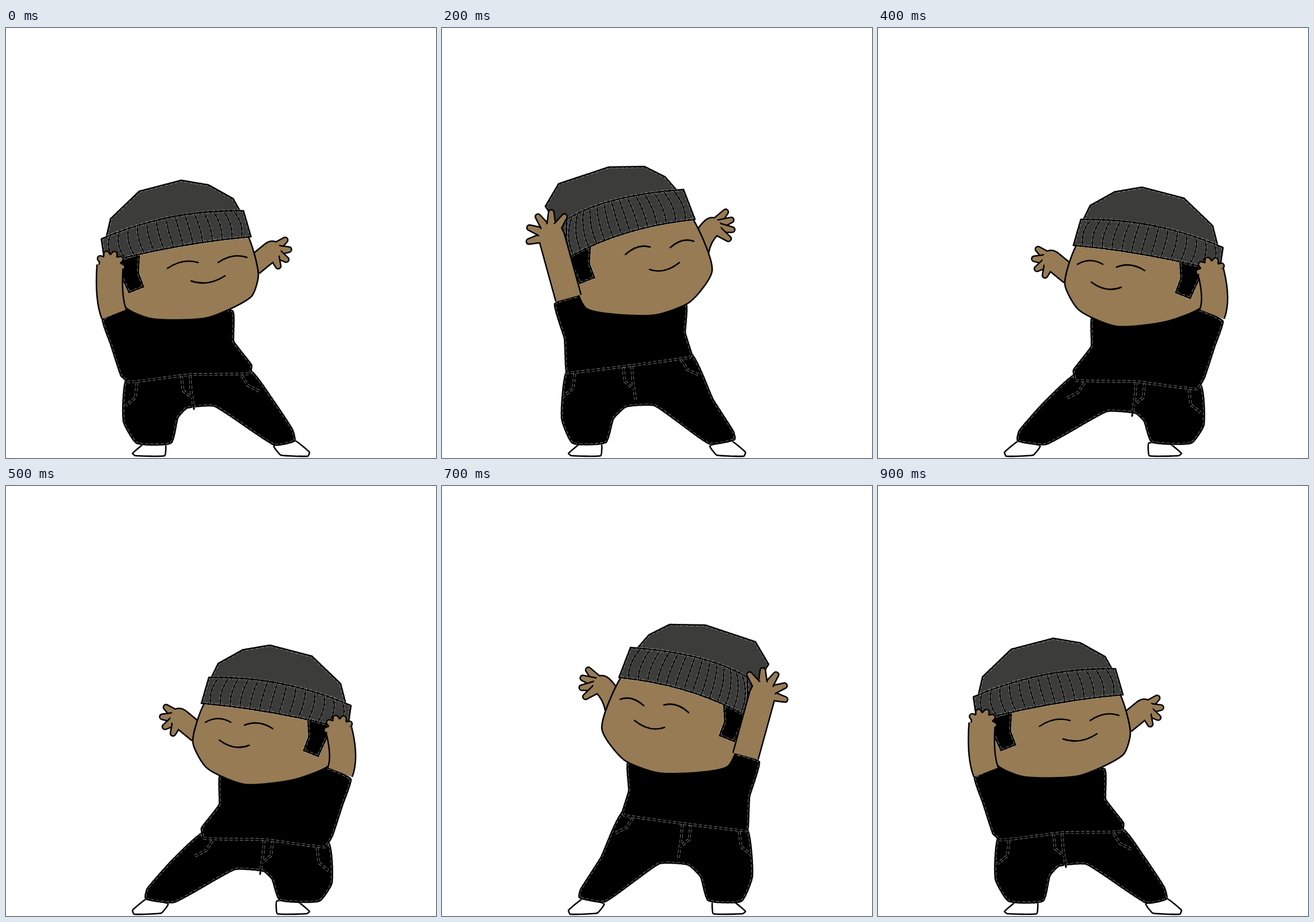
These frames come from a looping animation (748x748 px, 1000 ms). An HTML page:

```html
<!DOCTYPE html>
<html lang="en">
<head>
<meta charset="utf-8">
<title>Dancing in a beanie</title>
<style>
html, body { margin: 0; width: 100%; height: 100%; overflow: hidden; background: #fff; }
svg { display: block; width: 100vw; height: 100vh; }
path { stroke-linejoin: round; }
</style>
</head>
<body>
<svg id="stage" viewBox="0 0 748 748"></svg>
<script>
const SKIN = '#967b55', HAT = '#3c3c3b', LIGHT = '#c4c4c4', INK = '#000';
const STEP = 100, RIBS = 15;

// Key points are flat lists: x, y, x, y ...
const pairs = a => a.flatMap((v, i) => i % 2 ? [] : [[v, a[i + 1]]]);
const move = (a, dx, dy) => a.map((v, i) => v + (i % 2 ? dy : dx));
const flip = (a, axis) => pairs(a).reverse().flatMap(([x, y]) => [2 * axis - x, y]);
const both = (half, axis) => [...half, ...flip(half, axis)];

function mix(a, b, k) {
  if (typeof a === 'number') return a + (b - a) * k;
  if (Array.isArray(a)) return a.map((v, i) => mix(v, b[i], k));
  return Object.fromEntries(Object.keys(a).map(key => [key, mix(a[key], b[key], k)]));
}

// The sideburn has one form and hangs from the hat.
const sideburn = (x, y) =>
  move([-35, 8, 0, -4, -2, 30, 7, 54, -18, 64, -28, 42, -34, 29], x, y);

// Limbs: hand x, y, bend x, y, shoulder x, y, fan angle, finger gap, finger length, palm radius.
// Side poses face right; the other side is drawn mirrored.
const low = {
  crown: [182, 332, 232, 284, 305, 265, 352, 273, 395, 297],
  cuff: [166, 367, 282, 316, 413, 318, 426, 363, 301, 374, 172, 408],
  face: [194, 437, 207, 485, 255, 506, 350, 504, 426, 468, 439, 428, 421, 362],
  eyes: [281, 418, 334, 408, 369, 408, 419, 399],
  mouth: [322, 440, 381, 431],
  hair: [sideburn(232, 396)],
  left: [208, 488, 168, 507, 182, 550, 200, 605],
  waist: [214, 616, 320, 603, 425, 601],
  right: [427, 586, 396, 545, 394, 492],
  legs: [214, 602, 204, 683, 227, 722, 287, 722, 299, 678, 315, 661, 363, 658,
    466, 725, 502, 718, 498, 698, 463, 645, 422, 594],
  near: [181, 413, 177, 470, 188, 498, 291, 38, 25, 18],
  far: [463, 387, 447, 400, 430, 414, 15, 36, 33, 15]
};

const high = {
  crown: [180, 310, 203, 271, 290, 242, 352, 241, 388, 259],
  cuff: [217, 333, 284, 291, 420, 281, 440, 333, 312, 346, 215, 402],
  face: [224, 413, 249, 486, 300, 498, 372, 499, 432, 476, 470, 421, 437, 333],
  eyes: [319, 394, 362, 381, 397, 382, 438, 371],
  mouth: [361, 420, 413, 408],
  hair: [sideburn(258, 380)],
  left: [243, 465, 196, 480, 213, 540, 215, 585],
  waist: [217, 600, 330, 587, 431, 573],
  right: [434, 566, 423, 530, 424, 479],
  legs: [222, 588, 208, 678, 227, 722, 285, 721, 298, 680, 320, 659, 370, 657,
    464, 723, 509, 716, 507, 702, 472, 647, 428, 562],
  near: [190, 361, 205, 415, 220, 470, 235, 35, 44, 21],
  far: [470, 346, 452, 362, 447, 390, -6, 28, 39, 15]
};

const lowFar = {
  ...low,
  crown: move(low.crown, -16, 12),
  cuff: move(low.cuff, -18, 15),
  face: [173, 455, 187, 487, 248, 511, 333, 519, 398, 491, 423, 445, 404, 380],
  eyes: [284, 422, 333, 416, 357, 411, 401, 411],
  mouth: [325, 451, 377, 442],
  hair: [sideburn(223, 406)],
  left: move(low.left, -20, 3),
  waist: move(low.waist, -21, 12),
  right: move(low.right, -19, 9),
  legs: [190, 616, 181, 690, 203, 722, 272, 720, 285, 684, 300, 670, 350, 667,
    455, 724, 505, 718, 502, 700, 458, 650, 400, 600],
  near: [169, 424, 157, 472, 167, 498, 285, 38, 25, 18],
  far: [...move(low.far.slice(0, 6), -16, 16), ...low.far.slice(6)]
};

const MID = 368;
const side = [291, 432, 246, 449, 264, 492, 270, 525, 269, 555];
const lock = [241, 326, 262, 317, 248, 335, 246, 360];
const front = {
  crown: [285, 232, 301, 216, 373, 204, 440, 227, 463, 259],
  cuff: [247, 282, 372, 236, 480, 279, 497, 329, 372, 295, 239, 325],
  face: both([247, 335, 251, 367, 272, 400, 298, 437, 345, 453], MID),
  eyes: [296, 344, 345, 343, 393, 346, 440, 349],
  mouth: [342, 371, 397, 374],
  hair: [lock, flip(lock, MID)],
  left: side,
  waist: [267, 565, 368, 577, 469, 565],
  right: flip(side, MID),
  legs: both([270, 555, 240, 660, 236, 710, 262, 726, 299, 721, 308, 693, 340, 664], 373.5),
  near: [215, 356, 242, 395, 267, 440, 206, 40, 40, 20],
  symmetric: true
};

// On the way up the hand opens before it gets there.
function rising(from) {
  const p = mix(from, high, 0.5), [x, y] = high.near;
  p.near = [x - 5, y + 20, ...p.near.slice(2, 6), ...high.near.slice(6)];
  return p;
}

const poly = a => 'M' + pairs(a).join(' L');

function curve(a, k) {
  const p = pairs(a), n = p.length;
  const handle = (i, j) => {
    const [x, y] = p[i], [ax, ay] = p[(i + n - 1) % n], [bx, by] = p[(i + 1) % n];
    const len = Math.hypot(p[j][0] - x, p[j][1] - y);
    const s = (j === (i + 1) % n ? k : -k) * len / (Math.hypot(bx - ax, by - ay) || 1);
    return [x + (bx - ax) * s, y + (by - ay) * s];
  };
  return 'M' + p[0] + p.map((_, i) => {
    const j = (i + 1) % n;
    return ` C${handle(i, j)} ${handle(j, i)} ${p[j]}`;
  }).join('') + 'Z';
}

const path = (d, fill, stroke, width, extra = '') =>
  `<path d="${d}" fill="${fill}" stroke="${stroke}" stroke-width="${width}" ${extra}/>`;
const line = (d, w = 2.6, color = INK, cap = 'round') =>
  path(d, 'none', color, w, `stroke-linecap="${cap}"`);
const dashes = (d, w) => path(d, 'none', LIGHT, w, 'stroke-dasharray="6 3" opacity=".75"');
const shape = (d, fill) => path(d, fill, INK, 2.6);
const stitch = d => dashes(d, 4.4) + line(d, 2.8);
// A part with a thin broken light line just inside its outline.
const sewn = (d, fill) => path(d, fill, 'none', 0) + dashes(d, 4.2) + line(d);

function arc(x1, y1, x2, y2, bend) {
  return line(`M${x1},${y1} Q${(x1 + x2) / 2},${(y1 + y2) / 2 + bend} ${x2},${y2}`);
}

function limb([x, y, bx, by, ex, ey, angle, gap, len, palm], fingers, width) {
  const arm = `M${x},${y} Q${bx},${by} ${ex},${ey}`;
  const dot = `M${x},${y} h.01`;
  let hand = '';
  for (let i = 0; i < fingers; i++) {
    const a = (angle + (i - (fingers - 1) / 2) * gap) * Math.PI / 180;
    const c = Math.cos(a), s = Math.sin(a);
    const at = (along, across) => [x + c * along - s * across, y + s * along + c * across];
    const d = `M${at(palm / 2, 4)} L${at(len - 4, 0)} L${at(palm / 2, -4)}Z`;
    hand += path(d, INK, INK, 12) + path(d, SKIN, SKIN, 7);
  }
  return line(arm, width + 5, INK, 'butt') + line(dot, palm * 2 + 5) + hand +
    line(arm, width, SKIN, 'butt') + line(dot, palm * 2, SKIN);
}

const quad = (a, b, c, t) => (1 - t) * (1 - t) * a + 2 * t * (1 - t) * b + t * t * c;

// Top and bottom point of the cuff at t, from back to front.
function across([ax, ay, bx, by, cx, cy, dx, dy, ex, ey, fx, fy], t) {
  return [quad(ax, bx, cx, t), quad(ay, by, cy, t), quad(fx, ex, dx, t), quad(fy, ey, dy, t)];
}

function inside(cuff, t) {
  const [x1, y1, x2, y2] = across(cuff, t);
  return [(x1 + x2) / 2, (y1 + y2) / 2];
}

function hat({ crown, cuff }) {
  const [a, b, c, d, e, f] = pairs(cuff);
  let ribs = '';
  for (let i = 1; i < RIBS; i++) {
    const t = i / RIBS, [x1, y1, x2, y2] = across(cuff, t);
    ribs += `M${x1},${y1} Q${(x1 + x2) / 2 + (t - 0.52) * 30},${(y1 + y2) / 2} ${x2},${y2} `;
  }
  return sewn(poly([...inside(cuff, 0), ...crown, ...inside(cuff, 1)]) + 'Z', HAT) +
    sewn(`M${a} Q${b} ${c} L${d} Q${e} ${f}Z`, HAT) + dashes(ribs, 3.2) + line(ribs, 2);
}

// Pockets and fly hang from the corners and the middle of the waist.
function seams([lx, ly, mx, my, rx, ry]) {
  return [
    move([14, 1, 11, 27, -6, 41], lx, ly),
    move([-15, 1, -12, 28, 2, 39], mx, my),
    move([0, 1, 2, 28, 7, 60], mx, my),
    move([-15, 4, -4, 21, 18, 32], rx, ry)
  ].map(poly).join(' ');
}

function figure(p) {
  const { cuff, near } = p;
  const shoe = [466, 727, 478, 743, 525, 745, 528, 738, 503, 718];
  const heel = [242, 722, 220, 740, 225, 744, 276, 744, 277, 722];
  const face = [...p.face, ...inside(cuff, 0.9), ...inside(cuff, 0.5), ...inside(cuff, 0.1)];
  const [e1, e2] = [p.eyes.slice(0, 4), p.eyes.slice(4)];
  const arm = limb(near, 5, 43) + (p.symmetric ? stitch('M291,434 L304,457') : '');
  return shape(curve(p.symmetric ? flip(shoe, 374) : heel, 0.1), '#fff') +
    shape(curve(shoe, 0.1), '#fff') +
    (p.far ? limb(p.far, 4, 31) : '') +
    sewn(curve(p.legs, 0.15), INK) + stitch(seams(p.waist)) +
    sewn(curve([...p.left, ...p.waist, ...p.right], 0.1), INK) +
    shape(curve(face, 0.22), SKIN) +
    arc(...e1, -13) + arc(...e2, -13) + arc(...p.mouth, 15) +
    p.hair.map(h => sewn(poly(h) + 'Z', INK)).join('') +
    hat(p) + arm +
    (p.symmetric ? `<g transform="matrix(-1 0 0 1 ${2 * MID - 1} 0)">${arm}</g>` : '');
}

// [pose, mirrored] for each step of the loop
const dance = [
  [low], [rising(low)], [high], [front], [lowFar, true],
  [lowFar, true], [rising(lowFar), true], [high, true], [front], [low]
];

const stage = document.getElementById('stage');
stage.innerHTML = dance.map(([pose, mirrored]) =>
  `<g display="none"${mirrored ? ' transform="matrix(-1 0 0 1 748 0)"' : ''}>${figure(pose)}</g>`).join('');
const views = [...stage.children];

function draw() {
  const now = Math.floor(performance.now() / STEP) % dance.length;
  views.forEach((g, i) => g.setAttribute('display', i === now ? 'inline' : 'none'));
  requestAnimationFrame(draw);
}
draw();
</script>
</body>
</html>
```
